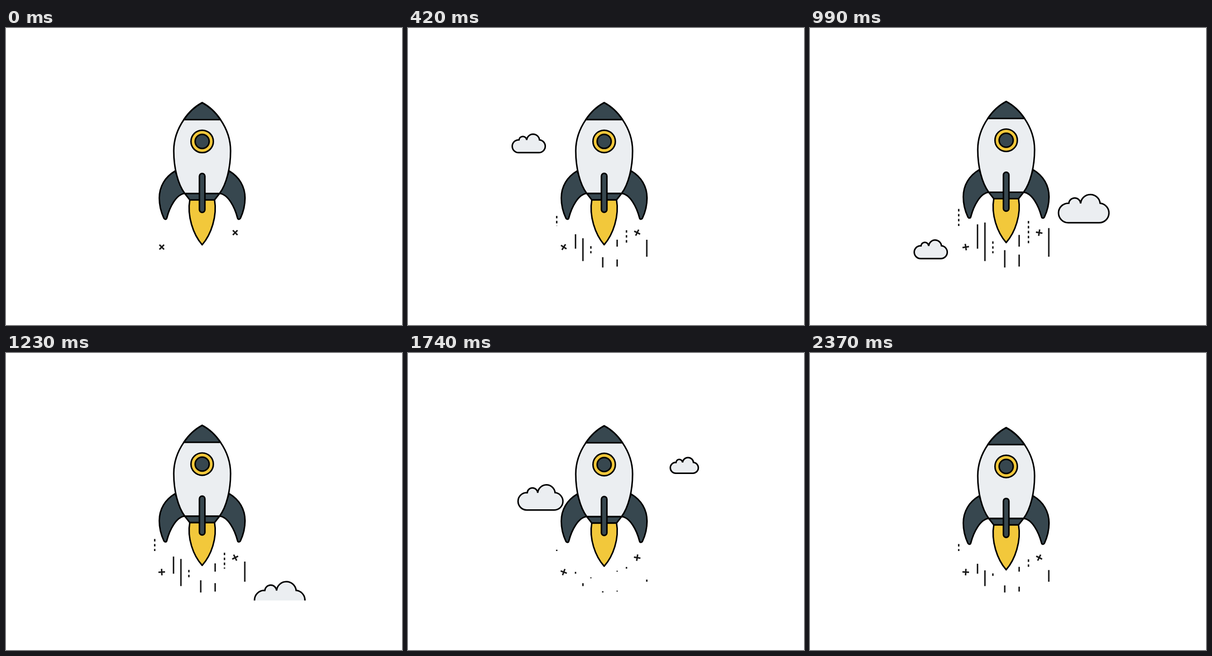
Recreate the animation shown at these times as an HTML page with a canvas. Size 864 by 648 pixels, loop 2.4 s.

```html
<!DOCTYPE html>
<html lang="en">
<head>
<meta charset="utf-8">
<title>Rocket</title>
<style>
  html, body { margin: 0; width: 100%; height: 100%; overflow: hidden; background: #fff; }
  canvas { display: block; width: 864px; height: 648px; }
</style>
</head>
<body>
<canvas id="stage" width="864" height="648"></canvas>
<script>
const ctx = document.getElementById('stage').getContext('2d');
const LOOP = 2400, STEP = 30, CYCLE = 900;
const INK = '#000', SOFT_INK = '#1a1a1a';
const DARK = '#37474f', LIGHT = '#ebeef1', YELLOW = '#f2c83b';
const CENTER = 428, STROKE = 3.24, DASH = 5.4;
const CLIP_TOP = 108, CLIP_HEIGHT = 432;

// Half shapes are drawn around x = 0 and mirrored where needed.
const fin = new Path2D('M-59 312C-81 325-93.5 346-93.5 371C-93.5 388-90 401-83.5 415' +
  'Q-82 417.5-80 417.3Q-77.5 417-77 414C-71 391-57 363-38 361Z');
const body = new Path2D('M0 163C17 172 30 185 40 200C55 222 62 245 62 268C62 305 53 341 38 361' +
  'H-38C-53 341-62 305-62 268C-62 245-55 222-40 200C-30 185-17 172 0 163Z');
const nose = new Path2D('M0 163C17 172 30 185 40 200H-40C-30 185-17 172 0 163Z');
const collar = new Path2D('M-38 361H38L27 375H-27Z');
const flame = new Path2D('M-27 0C-33 35-20 75 0 98C20 75 33 35 27 0Z');
const keel = new Path2D();
keel.roundRect(-6, 317.3, 12, 85, 6);

const cloud = new Path2D('M21.3 0A21.3 21.3 0 0 1 21.3-42.6L22.5-42.5A12.9 12.9 0 0 1 48.2-42' +
  'A21.4 21.4 0 0 1 90.8-42.5A21.3 21.3 0 0 1 88.7 0Z');

const clouds = [
  { x: 227.4, scale: 0.655, start: -4, speed: 0.4055 },
  { x: 542.2, scale: 1, start: 415, speed: 0.565 },
  { x: 240.1, scale: 0.89, start: 1252, speed: 0.497 },
  { x: 572.3, scale: 0.556, start: 1418, speed: 0.504 }
];

const trails = [
  { x: 324.5, bottom: 432, length: 41.3, dashed: true },
  { x: 365.5, bottom: 481.5, length: 59 },
  { x: 381.7, bottom: 508.5, length: 93.4 },
  { x: 399, bottom: 491.5, length: 29, dashed: true },
  { x: 424.9, bottom: 522.5, length: 42 },
  { x: 456.3, bottom: 477, length: 28.4 },
  { x: 456.3, bottom: 520.5, length: 29 },
  { x: 476.7, bottom: 470.5, length: 55, dashed: true },
  { x: 521, bottom: 499, length: 69.4 }
];

function shape(path, fill, width = STROKE) {
  ctx.fillStyle = fill;
  ctx.strokeStyle = INK;
  ctx.lineWidth = width;
  ctx.fill(path);
  ctx.stroke(path);
}

function disc(y, radius, fill) {
  const path = new Path2D();
  path.arc(0, y, radius, 0, Math.PI * 2);
  shape(path, fill);
}

function segment(x1, y1, x2, y2) {
  ctx.strokeStyle = SOFT_INK;
  ctx.lineWidth = STROKE;
  ctx.beginPath();
  ctx.moveTo(x1, y1);
  ctx.lineTo(x2, y2);
  ctx.stroke();
}

function drawCross(x, y, degrees) {
  ctx.save();
  ctx.translate(x, y);
  ctx.rotate(degrees * Math.PI / 180);
  segment(-7.2, 0, 7.2, 0);
  segment(0, -7.2, 0, 7.2);
  ctx.restore();
}

function drawTrails(phase) {
  if (phase === 0) return;
  for (const { x, bottom, length, dashed } of trails) {
    ctx.setLineDash(dashed ? [DASH, DASH] : []);
    segment(x, bottom - length * (1 - phase), x, bottom);
  }
  ctx.setLineDash([]);
}

function drawClouds(t) {
  ctx.save();
  ctx.beginPath();
  ctx.rect(0, CLIP_TOP, 864, CLIP_HEIGHT);
  ctx.clip();
  for (const { x, scale, start, speed } of clouds) {
    ctx.save();
    ctx.translate(x, 100 + speed * (t - start));
    ctx.scale(scale, scale);
    shape(cloud, LIGHT, STROKE / scale);
    ctx.restore();
  }
  ctx.restore();
}

// The first bob is a little shorter than the following ones.
function liftAt(t) {
  const first = 403, period = 489;
  const turn = t < first ? t / first : (t - first) / period;
  return 7.5 * (1 - Math.cos(turn * Math.PI * 2)) / 2;
}

function drawRocket(lift) {
  ctx.save();
  ctx.translate(CENTER, -lift);
  ctx.lineJoin = 'round';

  shape(fin, DARK);
  ctx.save();
  ctx.scale(-1, 1);
  shape(fin, DARK);
  ctx.restore();

  const flamePath = new Path2D();
  flamePath.addPath(flame, new DOMMatrix([1, 0, 0, 1 - 0.9 * lift / 98, 0, 375]));
  shape(flamePath, YELLOW);

  shape(collar, DARK);
  shape(body, LIGHT);
  shape(nose, DARK);
  disc(247.5, 24.4, YELLOW);
  disc(247.5, 15.3, DARK);
  shape(keel, DARK);
  ctx.restore();
}

function draw(t) {
  const phase = (t % CYCLE) / CYCLE;
  ctx.fillStyle = '#fff';
  ctx.fillRect(0, 0, 864, 648);
  drawTrails(phase);
  drawCross(339.8, 478, 45 + 360 * phase);
  drawCross(500, 446.5, 45 + 540 * phase);
  drawRocket(liftAt(t));
  drawClouds(t);
}

let origin = null;
function tick(now) {
  if (origin === null) origin = now;
  const elapsed = (now - origin) % LOOP;
  draw(Math.floor((elapsed + 1) / STEP) * STEP % LOOP);
  requestAnimationFrame(tick);
}

draw(0);
requestAnimationFrame(tick);
</script>
</body>
</html>
```
